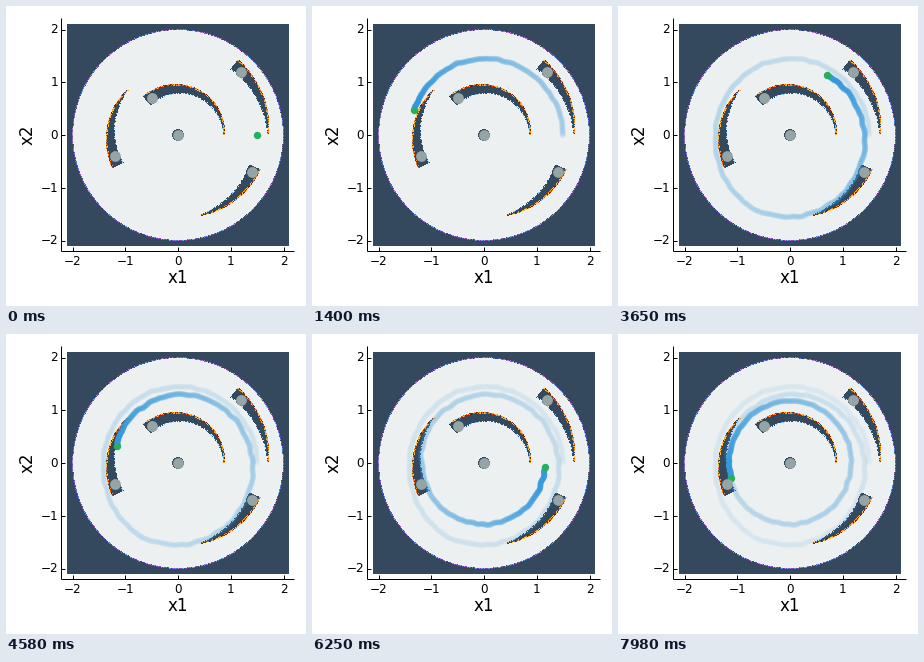
A matplotlib script that plays this animation: 300 by 300 pixels, repeating every 8 s.

```python
import numpy as np
import matplotlib.pyplot as plt
from matplotlib.animation import FuncAnimation
from matplotlib.colors import to_rgb

SIZE, DPI = 300, 100
FRAMES, STEP_MS = 320, 25
CX, CY, UNIT = 172, 129, 52.75
PT = 72 / DPI

DARK, LIGHT, GRAY = "#34495e", "#ecf0f1", "#95a5a6"
BLUE, GREEN = "#3498db", "#27ae60"
OUTER = ["#e8590c", "#ff9f1a", "#7a1c08", "#ffc23d", DARK]
INNER = ["#24507f", "#7cc8f5", DARK, LIGHT]
RIM = ["#8e44ad", "#6a4fd0", "#c07ae0", "#4f8fe8", DARK]

# each post with the start and sweep of its wake, in degrees clockwise
POSTS = [(1.2, 1.2, 51.5, 51), (-0.5, 0.7, 132.5, 132.5),
         (-1.2, -0.4, 207, 69), (1.4, -0.7, -22.5, 51.5), (0, 0, 0, 0)]

# turning points of the orbit: angle in radians, radius in pixels
ORBIT = [(0, 79), (1.5, 76.2), (2.8, 74.4), (3.4, 75.6), (4.25, 82.3),
         (4.9, 81.6), (6.3, 74.6), (7.3, 70), (8.2, 67.4), (9.5, 62),
         (12.2, 60.8), (14.2, 62.2), (16, 60.3)]
SPIN = 0.05
SUB = 2

rng = np.random.default_rng(4)


def speckle(img, mask, colors):
    shades = np.array([to_rgb(c) for c in colors])
    img[mask] = shades[rng.integers(len(colors), size=mask.sum())]


def field():
    x, y = np.meshgrid(np.arange(61, 283) + 0.5, np.arange(18, 240) + 0.5)
    dx, dy = x - CX, CY - y
    r, ang = np.hypot(dx, dy), np.degrees(np.arctan2(dy, dx))
    img = np.empty(r.shape + (3,))
    img[:] = to_rgb(DARK)
    img[r < 105.5] = to_rgb(LIGHT)
    speckle(img, np.abs(r - 105.4) < 0.5, RIM)
    for px, py, start, sweep in POSTS:
        if sweep:
            u = ((start - ang) % 360) / sweep
            on = u <= 1
            half = 5.8 * np.clip(1 - u, 0, 1) ** 0.8
            d = r - np.hypot(px, py) * UNIT - 0.6
            img[on & (np.abs(d) < half)] = to_rgb(DARK)
            speckle(img, on & (np.abs(d + half) < 0.5), INNER)
            speckle(img, on & (np.abs(d - half) < 0.8), OUTER)
        img[np.hypot(dx - px * UNIT, dy - py * UNIT) < 5.8] = to_rgb(DARK)
    return img


def area(diameter):
    return (diameter * PT) ** 2


def line(xs, ys):
    ax.plot(xs, ys, color="black", lw=PT, solid_capstyle="butt", zorder=2)


def label(x, y, text, px, **kw):
    ax.text(x, y, text, fontsize=px * PT, family="DejaVu Sans", **kw)


fig = plt.figure(figsize=(SIZE / DPI, SIZE / DPI), dpi=DPI, facecolor="white")
ax = fig.add_axes([0, 0, 1, 1])
ax.imshow(field(), extent=(61, 283, 240, 18), interpolation="nearest",
          aspect="auto", zorder=1)
ax.set_xlim(0, SIZE)
ax.set_ylim(SIZE, 0)
ax.axis("off")

line([55, 55], [12, 245])
line([55, 288], [244.7, 244.7])
for v in range(-2, 3):
    px, py = CX + v * UNIT, CY - v * UNIT
    line([px, px], [244.5, 241])
    line([55, 58.5], [py, py])
    name = str(v).replace("-", "\u2212")
    label(px, 258.9, name, 12, ha="center", va="baseline")
    label(52, py + 3.8, name, 12, ha="right", va="baseline")
label(CX, 277, "x1", 16.6, ha="center", va="baseline")
label(22, CY, "x2", 16.6, ha="center", va="center", rotation=90)

posts = np.array(POSTS)[:, :2] * UNIT
ax.scatter(CX + posts[:, 0], CY - posts[:, 1], s=area(10.8), c=GRAY,
           linewidths=0, zorder=6)

theta = SPIN / SUB * np.arange(FRAMES * SUB)
radius = np.interp(theta, *zip(*ORBIT))
jitter = rng.normal(0, 0.8, theta.size)
radius += np.convolve(jitter, np.ones(4) / 4, mode="same")
path = np.column_stack([CX + radius * np.cos(theta),
                        CY - radius * np.sin(theta)])

trail = ax.scatter([], [], s=area(6), linewidths=0, zorder=4)
dot = ax.scatter([], [], s=area(7.4), c=GREEN, linewidths=0, zorder=5)


def draw(k):
    n = k * SUB
    age = (n - np.arange(n)) / SUB
    rgba = np.empty((n, 4))
    rgba[:, :3] = to_rgb(BLUE)
    rgba[:, 3] = 1 / (1 + age / 10)
    trail.set_offsets(path[:n])
    trail.set_facecolors(rgba)
    dot.set_offsets(path[n:n + 1])
    return trail, dot


anim = FuncAnimation(fig, draw, frames=FRAMES, interval=STEP_MS,
                     init_func=lambda: draw(0), repeat=True)
plt.show()
```
